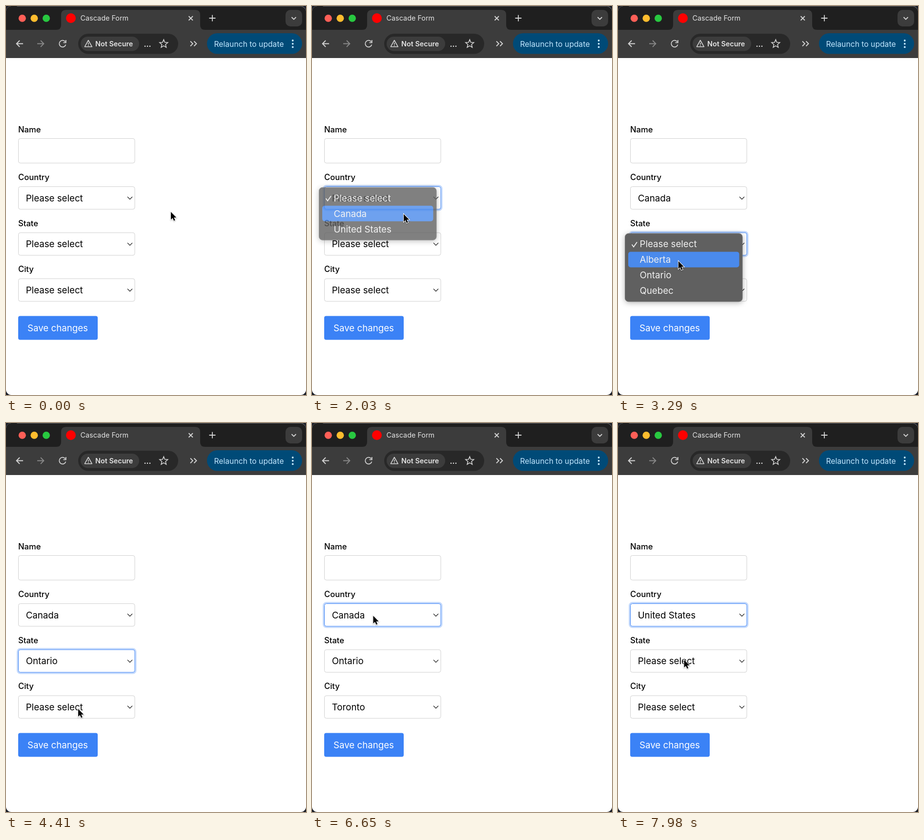
These frames come from a looping animation (615x800 px, 8 s). An HTML page:

```html
<!DOCTYPE html>
<html lang="en">
<head>
<meta charset="utf-8">
<title>Cascade Form</title>
<style>
  html, body { margin: 0; width: 100%; height: 100%; overflow: hidden; background: #181c26; }
  svg { display: block; width: 100%; height: 100%; font: 18.7px Inter, sans-serif; }
  .line { fill: none; stroke: #d4d4d4; stroke-width: 1.8; }
  .box { fill: #fff; stroke: #d0d0d0; }
  .label { font-size: 16.6px; font-weight: 500; }
  .thin { fill: none; stroke: #111; stroke-width: 1.2; }
  .ring { fill: none; stroke: #c3d9fc; stroke-width: 3; }
  .focused .box { stroke: #3b82f6; }
  #panel { filter: drop-shadow(0 2px 6px rgba(0, 0, 0, .3)); }
  #cursor { filter: drop-shadow(0 1px 1px rgba(0, 0, 0, .3)); }
</style>
</head>
<body>
<svg id="stage" viewBox="0 0 615 800">
  <defs><clipPath id="window"><rect width="615" height="800" rx="11"/></clipPath></defs>
  <g clip-path="url(#window)">
    <rect width="615" height="800" fill="#fff"/>
    <rect width="615" height="50" fill="#1f1f1f"/>
    <rect y="49" width="615" height="58" fill="#3c3c3c"/>
    <path d="M103 49q10 0 10-10V18q0-10 10-10H388q10 0 10 10V39q0 10 10 10z" fill="#3c3c3c"/>
    <rect x=".5" y=".5" width="614" height="130" rx="11" fill="none" stroke="#66666a" stroke-dasharray="0 11 592 2000"/>
  </g>

  <circle cx="33.3" cy="25.3" r="7.5" fill="#ff5f57"/>
  <circle cx="57.9" cy="25.3" r="7.5" fill="#febc2e"/>
  <circle cx="82.5" cy="25.3" r="7.5" fill="#28c840"/>
  <circle cx="133" cy="25" r="10" fill="#f00"/>
  <text x="152.5" y="30" font-size="14.4" fill="#e3e3e3">Cascade Form</text>
  <path class="line" d="M374.5 21l8.5 8.5m0-8.5l-8.5 8.5M416.500 25h13m-6.500-6.500v13"/>
  <rect x="573" y="8" width="34" height="34" rx="10" fill="#3c3c3c"/>
  <path class="line" d="M585.500 23l4.500 4.500l4.500-4.500"/>

  <path class="line" d="M35 77.500H21.500m6.500-6.500l-6.500 6.500l6.500 6.500"/>
  <path class="line" stroke-opacity=".5" d="M64 77.500H77.500m-6.500-6.500l6.500 6.500l-6.500 6.500"/>
  <path class="line" d="M121.500 73.500a6.800 6.800 0 1 0 1 6M122.800 70v5.300h-5.300"/>
  <rect x="148" y="57" width="205" height="41.500" rx="20.700" fill="#282828"/>
  <rect x="153" y="63" width="120" height="29.500" rx="14.700" fill="#3c3c3c"/>
  <path class="line" stroke-linejoin="round" style="stroke-width:1.6" d="M168.800 70.500l7.500 13.300h-15zm0 5v3.700m0 1.400v1.600"/>
  <text x="183" y="82.700" font-size="14.4" font-weight="600" fill="#e3e3e3">Not Secure</text>
  <g fill="#e3e3e3"><circle cx="285" cy="82.700" r="1.300"/><circle cx="290" cy="82.700" r="1.300"/><circle cx="295" cy="82.700" r="1.300"/></g>
  <path id="star" class="line" style="stroke-width:1.6"/>
  <path class="line" d="M378 72.500l5 5l-5 5m7.500-10l5 5l-5 5"/>
  <rect x="412" y="56" width="195" height="42.500" rx="21" fill="#004a77"/>
  <text x="426.500" y="83.500" font-size="15.7" fill="#c2e7ff">Relaunch to update</text>
  <g fill="#c2e7ff"><circle cx="587.800" cy="71" r="1.900"/><circle cx="587.800" cy="77.700" r="1.900"/><circle cx="587.800" cy="84.400" r="1.900"/></g>

  <text class="label" x="25" y="259.700">Name</text>
  <rect class="box" x="25.500" y="272.500" width="238.500" height="50.500" rx="4"/>
  <g id="fields"></g>
  <rect x="25" y="637.500" width="163" height="49" rx="4" fill="#3b82f6"/>
  <text x="44" y="669.300" fill="#fff">Save changes</text>

  <g id="menu"></g>
  <path id="cursor" d="M0 0V15.700L3.600 12.400L6.200 18.200L8.700 17.100L6.200 11.500H11.200Z" fill="#000" stroke="#fff" stroke-width="2" paint-order="stroke"/>
</svg>
<script>
const LOOP = 8000, ROW = 32, FADE_START = 78, FADE_TIME = 310, COMMIT = 370;
const PROMPT = 'Please select';
const $ = id => document.getElementById(id);

const fields = [['Country', 394.7], ['State', 489.4], ['City', 584]].map(([label, y]) => ({ label, y }));

// Each menu: field index, focus / open / pick times, options, checked and chosen rows.
const menus = [
  { field: 0, focus: 910, open: 980, pick: 1890, options: [PROMPT, 'Canada', 'United States'], checked: 0, chosen: 1 },
  { field: 1, focus: 2940, open: 3010, pick: 3780, options: [PROMPT, 'Alberta', 'Ontario', 'Quebec'], checked: 0, chosen: 2 },
  { field: 2, focus: 4550, open: 4620, pick: 5180, options: [PROMPT, 'Toronto'], checked: 0, chosen: 1 },
  { field: 0, focus: 6610, open: 6720, pick: 7420, options: [PROMPT, 'Canada', 'United States'], checked: 1, chosen: 2 }
];

// Pointer moves: start, end, x, y reached.
const startPoint = [338, 423.5];
const moves = [
  [70, 560, 200, 397], [1400, 1680, 188, 428], [2270, 2870, 118, 487],
  [3080, 3430, 127, 545], [4170, 4410, 148, 588], [4690, 4970, 140, 611.5],
  [5880, 6590, 125.5, 396.5], [7070, 7280, 128, 425], [7800, 7980, 135.5, 487]
];

$('star').setAttribute('d', 'M' + Array.from({ length: 10 }, (_, i) => {
  const r = i % 2 ? 3.9 : 8.8, a = i * Math.PI / 5;
  return `${323.3 + r * Math.sin(a)} ${78 - r * Math.cos(a)}`;
}).join('L') + 'Z');

for (const f of fields) {
  const group = document.createElementNS('http://www.w3.org/2000/svg', 'g');
  group.innerHTML = `
    <text class="label" x="25" y="${f.y - 36.6}">${f.label}</text>
    <rect class="ring" x="23.500" y="${f.y - 25.2}" width="242.500" height="50.500" rx="6"/>
    <rect class="box" x="25.500" y="${f.y - 23.2}" width="238.500" height="46.500" rx="4"/>
    <text class="value" x="40.700" y="${f.y + 7}"></text>
    <path class="thin" d="M249 ${f.y - 2.3}l5 5l5-5"/>`;
  $('fields').append(group);
  f.group = group;
  f.ring = group.querySelector('.ring');
  f.value = group.querySelector('.value');
}

function pointerAt(t) {
  let [x, y] = startPoint;
  for (const [start, end, toX, toY] of moves) {
    const p = Math.min(1, Math.max(0, (t - start) / (end - start)));
    const e = p * p * (3 - 2 * p);
    x += (toX - x) * e;
    y += (toY - y) * e;
  }
  return [x, y];
}

function valuesAt(t) {
  const values = [PROMPT, PROMPT, PROMPT];
  for (const m of menus) {
    if (t < m.pick + COMMIT) break;
    values[m.field] = m.options[m.chosen];
    values.fill(PROMPT, m.field + 1);
  }
  return values;
}

function menuMarkup(m, t, pointerY) {
  const first = fields[m.field].y - m.checked * ROW;
  const top = first - 22;
  const blink = t >= m.pick && t < m.pick + 60;
  const hover = t >= m.pick ? m.chosen : Math.floor((pointerY - first + ROW / 2) / ROW);
  const rows = m.options.map((option, i) => {
    const y = first + i * ROW;
    return (i === hover && !blink ? `<rect x="21" y="${y - 16}" width="227.500" height="32" rx="5" fill="#4a8aec"/>` : '') +
      (i === m.checked ? `<path d="M28.500 ${y + 1}l3.500 5l7-10" fill="none" stroke="#eee" stroke-width="1.800"/>` : '') +
      `<text x="44.500" y="${y + 7}" fill="#f0f0f0">${option}</text>`;
  });
  return `<rect id="panel" x="14.500" y="${top + .5}" width="240.500" height="${m.options.length * ROW + 12}"
    rx="7" fill="#606060" stroke="#747474"/>` + rows.join('');
}

function draw(t) {
  const [x, y] = pointerAt(t);
  $('cursor').setAttribute('transform', `translate(${x} ${y})`);

  const active = menus.filter(m => t >= m.focus).pop();
  const values = valuesAt(t);
  fields.forEach((f, i) => {
    const focused = !!active && active.field === i;
    f.group.setAttribute('class', focused ? 'focused' : '');
    f.ring.style.display = focused ? '' : 'none';
    f.value.textContent = values[i];
  });

  const fade = active ? 1 - Math.max(0, t - active.pick - FADE_START) / FADE_TIME : 0;
  const visible = active && t >= active.open && fade > 0;
  $('menu').innerHTML = visible ? menuMarkup(active, t, y) : '';
  $('menu').setAttribute('opacity', Math.max(0, fade));
}

const begin = performance.now();
function tick() {
  draw((performance.now() - begin) % LOOP);
  requestAnimationFrame(tick);
}
tick();
</script>
</body>
</html>
```
